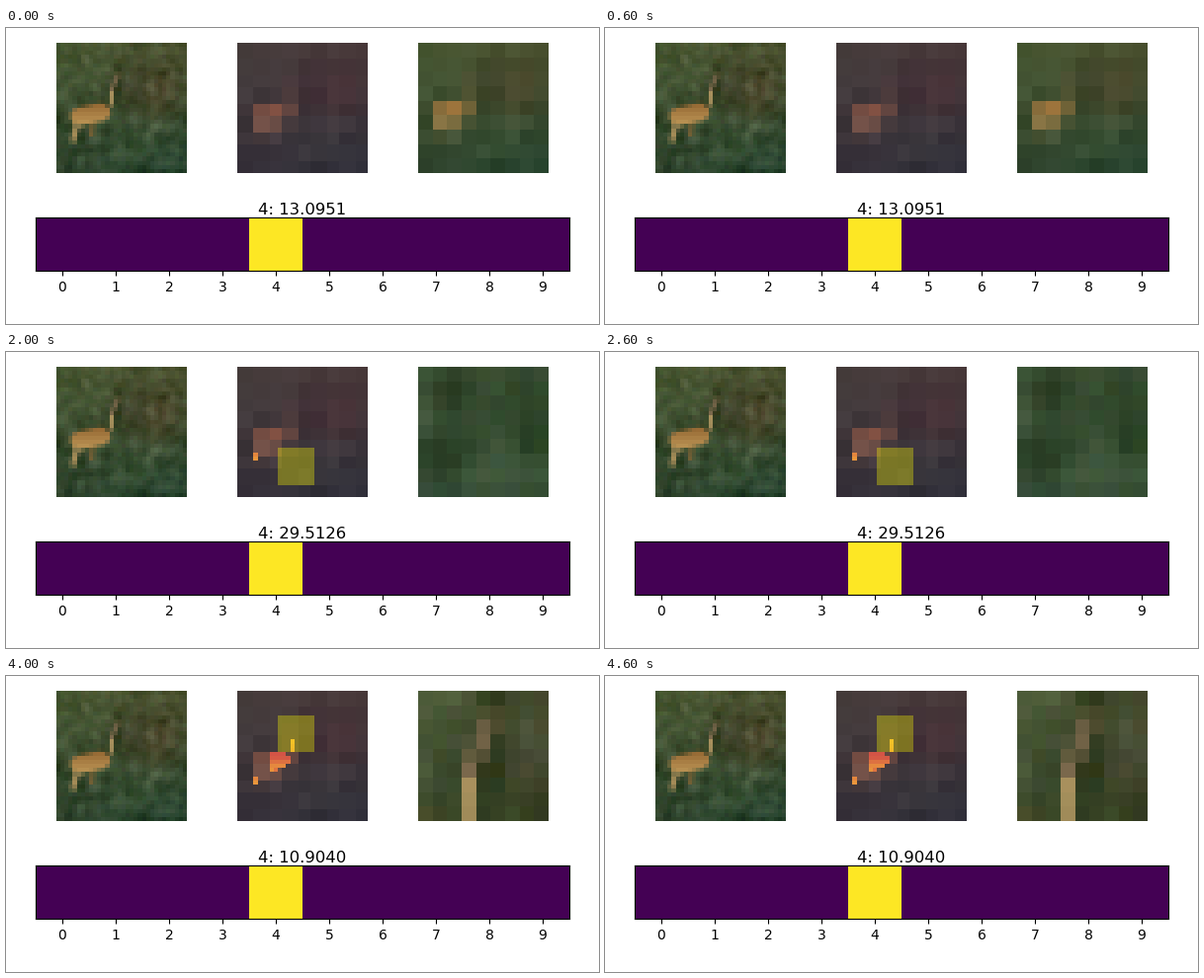
Animation of 600 by 300 pixels, one loop 5 s. Source, as a matplotlib script:

```python
import numpy as np
import matplotlib.pyplot as plt
from matplotlib.animation import FuncAnimation

W, H, DPI = 600, 300, 100
N, G = 32, 9                       # scene size, glimpse size
SCORES = [13.0951, 20.9340, 29.5126, 16.5827, 10.9040]
CORNERS = [(20, 0), (20, 10), (12, 8), (6, 10)]   # top-left of each glimpse

rng = np.random.default_rng(7)
row, col = np.mgrid[0:N, 0:N].astype(float)


def mix(a, b, t):
    """Blend colours a and b by t, a number or an N x N map."""
    a, b = np.asarray(a, float), np.asarray(b, float)
    return a + np.asarray(t)[..., None] * (b - a)


def blob(img, r, c, size, color):
    near = np.exp(-((row - r) ** 2 + (col - c) ** 2) / size ** 2)
    return mix(img, color, 0.7 * near)


def stroke(img, start, end, radius, color):
    """Draw a thick soft line between two (row, column) points."""
    (r0, c0), (r1, c1) = start, end
    dr, dc = r1 - r0, c1 - c0
    t = np.clip(((row - r0) * dr + (col - c0) * dc) / (dr ** 2 + dc ** 2), 0, 1)
    dist = np.hypot(row - r0 - t * dr, col - c0 - t * dc)
    return mix(img, color, np.clip(radius + 0.5 - dist, 0, 1))


def soften(a):
    for axis in (0, 1):
        a = (np.roll(a, 1, axis) + 2 * a + np.roll(a, -1, axis)) / 4
    return a


def make_scene():
    top = mix((74, 90, 52), (80, 86, 52), col / N)
    bottom = mix((44, 64, 42), (38, 68, 48), col / N)
    img = mix(top, bottom, row / N)
    img = blob(img, 11, 24, 7, (88, 78, 50))
    img = blob(img, 9, 17, 5, (58, 62, 38))
    img = blob(img, 25, 18, 4, (66, 92, 60))
    img += 20 * soften(rng.normal(size=(N, N)))[..., None]
    img += 2 * rng.normal(size=(N, N, 3))

    # standing animal, lighter towards the belly
    fur = mix((146, 100, 48), (190, 152, 88), np.clip((row - 14) / 6, 0, 1))
    img = stroke(img, (19, 8.4), (22, 8.2), 0.5, (125, 98, 52))
    img = stroke(img, (19, 4.6), (23.5, 3.6), 0.5, (172, 144, 90))
    img = stroke(img, (16.6, 10.3), (17.6, 5.4), 2.3, fur)
    img = stroke(img, (14.5, 12.9), (11.5, 13), 0.5, (170, 146, 94))
    img = stroke(img, (11, 13), (7.5, 14.5), 0.5, (122, 104, 76))
    return np.clip(img, 0, 255)


def shrink(img):
    """Average the scene into G x G blocks."""
    e = np.ceil(np.arange(G + 1) * N / G).astype(int)
    return np.array([[img[e[i]:e[i + 1], e[j]:e[j + 1]].mean((0, 1))
                      for j in range(G)] for i in range(G)])


scene = make_scene()
coarse = shrink(scene)
cell = np.arange(N) * G // N
base = mix(coarse[cell][:, cell], (68, 1, 84), 0.3)
warm = scene[..., 0] - scene[..., 2] > 65
heat = mix((212, 84, 70), (238, 165, 58), np.clip((scene[..., 1] - 115) / 30, 0, 1))


def window(step):
    r, c = CORNERS[step - 1]
    return slice(r, r + G), slice(c, c + G)


def memory(step):
    """Coarse view, with warm pixels lit up in every part seen so far."""
    img = base.copy()
    seen = np.zeros((N, N), bool)
    for k in range(1, step + 1):
        seen[window(k)] = True
    img[seen & warm] = heat[seen & warm]
    if step:
        img[window(step)] = mix(img[window(step)], (255, 255, 0), 0.33)
    return img


def detail(step):
    return scene[window(step)] if step else coarse


def to_rgb(img):
    return np.clip(img, 0, 255).astype(np.uint8)


fig = plt.figure(figsize=(W / DPI, H / DPI), dpi=DPI, facecolor="white")


def add_axes(x, y, w, h):
    return fig.add_axes([x / W, 1 - (y + h) / H, w / W, h / H])


def panel(x, img):
    ax = add_axes(x, 15, 131.8, 132)
    ax.axis("off")
    return ax.imshow(to_rgb(img), interpolation="nearest", aspect="auto")


panel(51, scene)
mem_im = panel(234, memory(0))
det_im = panel(417, detail(0))

bar = add_axes(29.95, 192, 540, 54)
bar.imshow(np.eye(10)[4:5], cmap="viridis", interpolation="nearest", aspect="auto")
bar.set_xticks(range(10))
bar.set_yticks([])
title = bar.set_title("", fontsize=11.85, pad=2)


def update(i):
    mem_im.set_data(to_rgb(memory(i)))
    det_im.set_data(to_rgb(detail(i)))
    title.set_text(f"4: {SCORES[i]:.4f}")
    return mem_im, det_im, title


anim = FuncAnimation(fig, update, frames=len(SCORES), interval=1000,
                     repeat=True, repeat_delay=0, blit=False)
plt.show()
```
